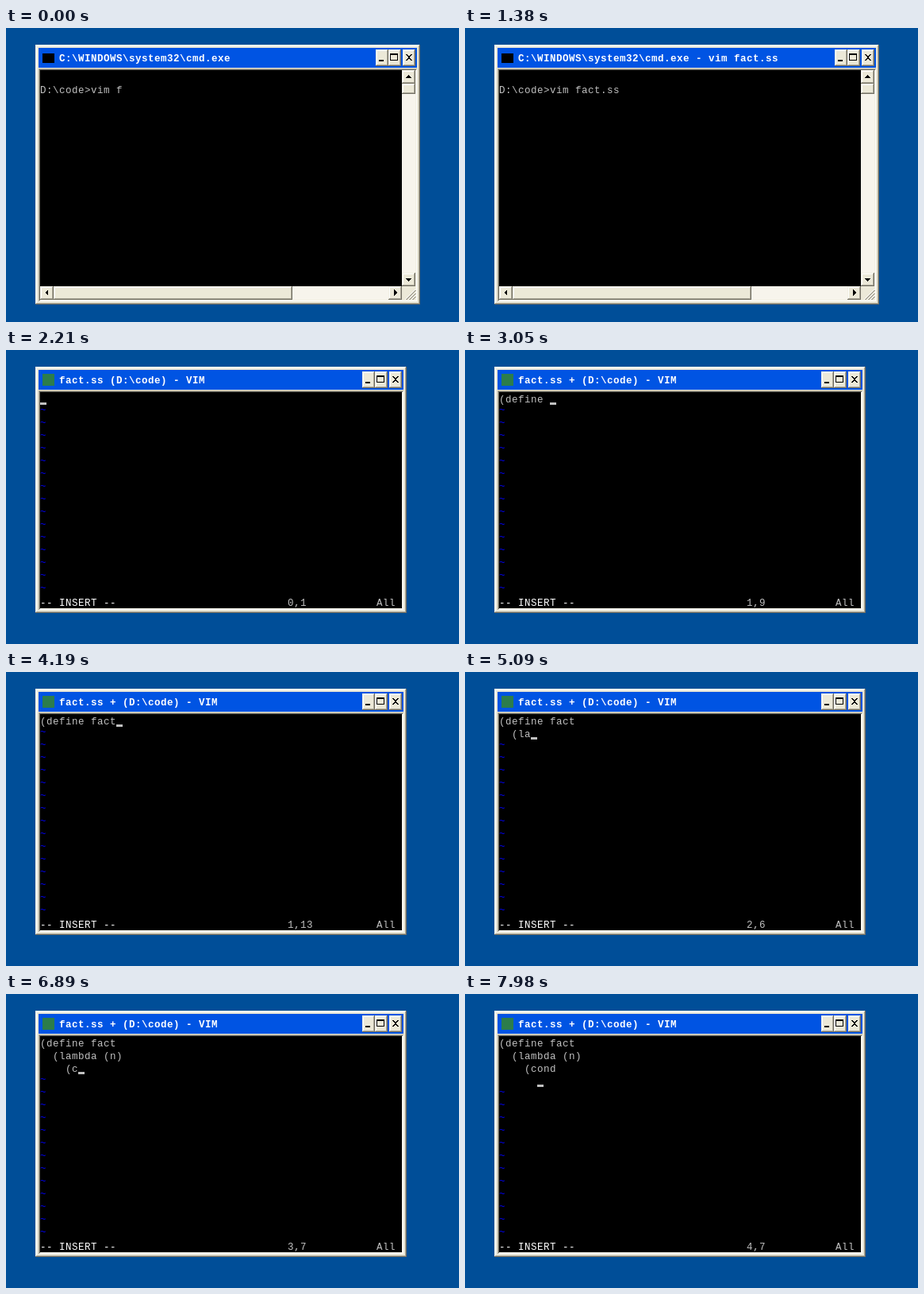
An HTML page that plays this animation: 571 px wide and 370 px high, repeating every 8000 ms.

```html
<!DOCTYPE html>
<html lang="en">
<head>
<meta charset="utf-8">
<title>Typing in the console</title>
<style>
  html, body { margin: 0; width: 100%; height: 100%; overflow: hidden; background: #004e98; }
  div, i, pre, svg { position: absolute; margin: 0; }
  pre {
    font: 12.5px/16px "Liberation Mono", "Courier New", monospace;
    letter-spacing: .5px;
    color: #c0c0c0;
  }
  .raised {
    background: #ece9d8;
    box-shadow: inset -1px -1px #716f64, inset 1px 1px #f1efe2,
                inset -2px -2px #aca899, inset 2px 2px #fff;
  }
  svg { left: 0; top: 0; width: 100%; height: 100%; overflow: visible; shape-rendering: crispEdges; }

  #win { left: 37px; top: 21px; width: 485px; height: 327px; }
  #win.vim { width: 468px; height: 310px; }
  .bar { left: 4px; right: 4px; top: 4px; height: 25px; background: #0054e3; }
  #title { left: 30px; top: 10px; color: #fff; font-weight: bold; }
  #icon { left: 9px; top: 11px; width: 15px; height: 12px; background: #000; }
  .vim #icon { top: 9px; height: 15px; background: #2c7d4b; }
  .cap { top: 6px; width: 16px; height: 21px; }

  .edge {
    left: 4px; right: 4px; top: 30px; bottom: 4px; background: #ece9d8;
    box-shadow: inset 1px 1px #aca899, inset -1px -1px #fff,
                inset 2px 2px #716f64, inset -2px -2px #f1efe2;
  }
  .vim .scroll { display: none; }
  .track { background: #f7f4ec; }
  .scroll .raised { width: 17px; height: 17px; }

  #screen { left: 6px; top: 32px; width: 456px; height: 272px; background: #000; overflow: hidden; }
  #screen pre { left: 0; top: 2px; }
  #screen #tildes { top: -1px; color: #0000f0; }
  #screen #mode, #screen #ruler, #screen #all { top: 258px; }
  #screen #ruler { left: 312px; }
  #screen #all { left: 424px; }
  #cursor { width: 8px; background: #c0c0c0; }
  .match { width: 8px; height: 16px; background: #008080; }
</style>
</head>
<body>
<div id="win" class="raised">
  <div class="bar"></div>
  <i id="icon"></i>
  <pre id="title"></pre>
  <i class="cap raised" style="right:40px"><svg><path d="M4 13h6v2h-6z"/></svg></i>
  <i class="cap raised" style="right:24px"><svg><path d="M2 5h10v9h-10zM3 7v6h8v-6z" fill-rule="evenodd"/></svg></i>
  <i class="cap raised" style="right:6px"><svg><path d="M4 6h2l2 3 2-3h2l-3 4 3 4h-2l-2-3-2 3h-2l3-4z"/></svg></i>

  <div class="edge"></div>
  <div class="scroll">
    <i class="track" style="left:462px;top:32px;width:17px;height:272px"></i>
    <i class="raised" style="left:462px;top:32px"><svg><path d="M4 10h8l-4-4z"/></svg></i>
    <i class="raised" style="left:462px;top:49px;height:13px"></i>
    <i class="raised" style="left:462px;top:287px"><svg><path d="M4 7h8l-4 4z"/></svg></i>
    <i class="track" style="left:6px;top:304px;width:456px;height:17px"></i>
    <i class="raised" style="left:6px;top:304px"><svg><path d="M10 4v8l-4-4z"/></svg></i>
    <i class="raised" style="left:23px;top:304px;width:301px"></i>
    <i class="raised" style="left:445px;top:304px"><svg><path d="M7 4v8l4-4z"/></svg></i>
    <svg style="left:462px;top:304px;width:17px;height:17px" fill="none">
      <path d="M5 17L17 5M9 17L17 9M13 17L17 13" stroke="#aca899" stroke-width="2"/>
      <path d="M4 17L17 4M8 17L17 8M12 17L17 12" stroke="#fff"/>
    </svg>
  </div>

  <div id="screen">
    <i class="match"></i><i class="match"></i>
    <pre id="text"></pre>
    <pre id="tildes"></pre>
    <pre id="mode"></pre>
    <pre id="ruler"></pre>
    <pre id="all"></pre>
    <i id="cursor"></i>
  </div>
</div>

<script>
const LOOP = 8000, VIM_START = 1500, INSERT = 1810, TITLE_PLUS = 2460;
const CMD = 'C:\\WINDOWS\\system32\\cmd.exe';
const FILE = 'fact.ss';
const CODE = '(define fact\n  (lambda (n)\n    (cond\n      ';

// Shell: [time, typed letters of the file name, cursor shown]
const shell = [
  [0, 1, 0], [120, 2, 1], [410, 3, 0], [690, 4, 1], [830, 5, 0],
  [1110, 6, 1], [1240, 7, 1], [1380, 7, 0]
];

// Editor: [time, end of the typed code]
const editor = [
  [VIM_START, ''], [2330, '('], [2740, '(def'], [2890, '(defin'], [3050, '(define '],
  [3330, ' f'], [3460, ' fa'], [3880, 'fac'], [4190, 'fact'], [4310, 'fact\n  '],
  [4700, '\n  ('], [4830, '(l'], [4960, '(la'], [5100, '(lamb'], [5230, '(lambd'],
  [5370, '(lambda'], [5510, '(lambda '], [5770, 'lambda ('], [5900, '(n'], [6030, '(n)'],
  [6320, '(n)\n    '], [6590, '\n    ('], [6890, '(c'], [7010, '(co'],
  [7410, '(con'], [7550, '(cond'], [7980, '(cond\n      ']
].map(([time, end]) => [time, CODE.slice(0, CODE.indexOf(end) + end.length)]);

const $ = id => document.getElementById(id);
const matches = document.querySelectorAll('.match');
const at = (list, t) => list.findLast(s => s[0] <= t);

function put(id, text) {
  if ($(id).textContent !== text) $(id).textContent = text;
}

function place(el, col, row, dy = 0) {
  el.style.left = col * 8 + 'px';
  el.style.top = row * 16 + dy + 'px';
}

function showCursor(col, row, height, on) {
  const c = $('cursor');
  place(c, col, row, 16 - height);
  c.style.height = height + 'px';
  c.hidden = !on;
  c.style.display = on ? '' : 'none';
}

function drawShell(t) {
  const [, count, on] = at(shell, t);
  const line = 'D:\\code>vim ' + FILE.slice(0, count);
  put('title', CMD + (t >= 1380 ? ' - vim ' + FILE : ''));
  put('text', '\n' + line);
  ['tildes', 'mode', 'ruler', 'all'].forEach(id => put(id, ''));
  showCursor(line.length, 1, 3, on);
}

function drawEditor(t) {
  const code = at(editor, t)[1];
  const lines = code.split('\n');
  const row = lines.length, col = lines[row - 1].length;
  const insert = t >= INSERT;
  put('title', FILE + (t >= TITLE_PLUS ? ' +' : '') + ' (D:\\code) - VIM');
  put('text', code);
  put('tildes', '\n'.repeat(row) + '~\n'.repeat(16 - row));
  put('mode', insert ? '-- INSERT --' : `"${FILE}" 0L, 0C`);
  $('mode').style.color = insert ? '#fff' : '';
  put('ruler', code ? row + ',' + (col + 1) : insert ? '0,1' : '0,0-1');
  put('all', 'All');
  showCursor(col, row - 1, insert ? 3 : 16, true);
  return code.endsWith(')') && [lines[row - 1].lastIndexOf('('), col - 1, row - 1];
}

function draw() {
  const t = performance.now() % LOOP;
  const vim = t >= VIM_START;
  $('win').classList.toggle('vim', vim);
  const pair = vim ? drawEditor(t) : drawShell(t);
  matches.forEach((m, i) => {
    m.style.display = pair ? '' : 'none';
    if (pair) place(m, pair[i], pair[2]);
  });
  requestAnimationFrame(draw);
}
draw();
</script>
</body>
</html>
```
